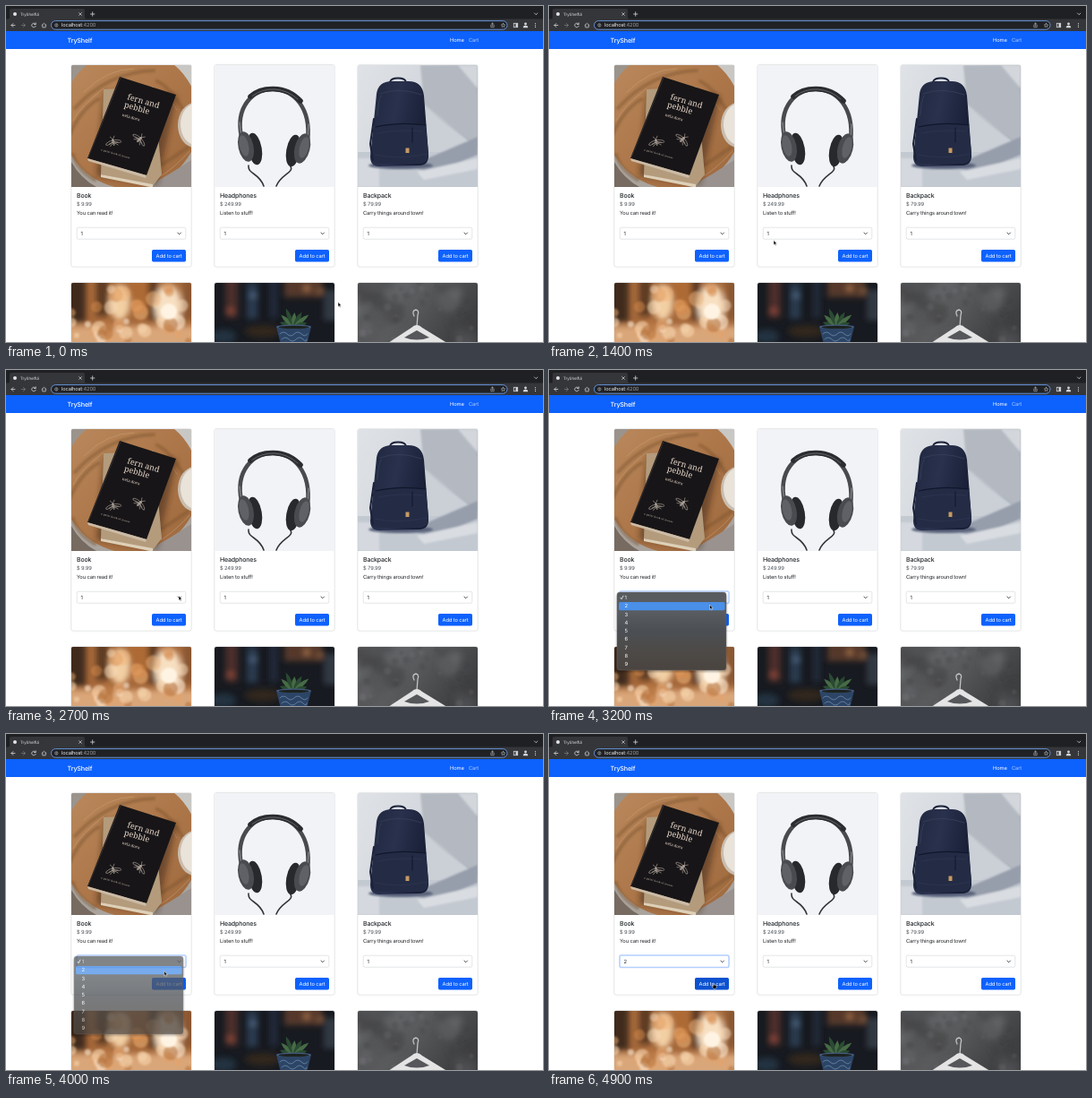
Recreate the animation shown at these times as an HTML page. Size 600 px wide and 375 px high, loop 5 s.

```html
<!DOCTYPE html>
<html lang="en">
<head>
<meta charset="utf-8">
<title>TryShelfUi</title>
<style>
html, body { margin: 0; width: 100%; height: 100%; overflow: hidden; background: #fff; }
svg { display: block; width: 100vw; height: 100vh; }
text { font-family: Inter, "Open Sans", sans-serif; font-size: 5.8px; letter-spacing: -.025em; white-space: pre; text-rendering: geometricPrecision; }
.title { font-size: 7px; font-weight: 550; }
.line { fill: none; stroke-linecap: round; stroke-linejoin: round; }
.book text { font-family: "Noto Serif", "Liberation Serif", serif; fill: #e9d9cb; letter-spacing: 0; }
</style>
</head>
<body>
<svg id="stage" viewBox="0 0 600 375" preserveAspectRatio="none"></svg>
<script>
const LOOP = 5000, STEP = 100;
const OPEN = 2800, FADE = 3800, CLOSE = 4200;
const BLUE = '#0d61fd';
const stage = document.getElementById('stage');

const rect = (x, y, w, h, fill, more = '') => `<rect x="${x}" y="${y}" width="${w}" height="${h}" fill="${fill}" ${more}/>`;
const oval = (x, y, rx, ry, fill, more = '') => `<ellipse cx="${x}" cy="${y}" rx="${rx}" ry="${ry}" fill="${fill}" ${more}/>`;
const dot = (x, y, r, fill, more) => oval(x, y, r, r, fill, more);
const shape = (d, fill, more = '') => `<path d="${d}" fill="${fill}" ${more}/>`;
const line = (d, stroke, width = 1, more = '') => `<path class="line" d="${d}" stroke="${stroke}" stroke-width="${width}" ${more}/>`;
const text = (x, y, s, fill, more = '') => `<text x="${x}" y="${y}" fill="${fill}" ${more}>${s}</text>`;
const group = (body, more = '') => `<g ${more}>${body}</g>`;
const soft = (body, n) => group(body, `filter="url(#blur${n})"`);
const gradient = (id, stops, dir = 'x2="0" y2="1"') => `<linearGradient id="${id}" ${dir}>` +
  stops.map((c, i) => `<stop offset="${i / (stops.length - 1)}" stop-color="${c}"/>`).join('') + '</linearGradient>';

function spots(seed, count, tones, top, bottom, size, opacity) {
  const random = () => (seed = seed * 16807 % 2147483647) / 2147483647;
  return Array.from({ length: count }, (_, i) =>
    dot(random() * 134, top + random() * (bottom - top), size * (.5 + random()), tones[i % tones.length], `opacity="${opacity}"`)).join('');
}

function defs() {
  const blurs = [1, 3, 7].map(n => `<filter id="blur${n}" x="-50%" y="-50%" width="200%" height="200%"><feGaussianBlur stdDeviation="${n}"/></filter>`);
  const clips = [0, 1].map(row => `<clipPath id="photo${row}"><path d="M0 ${row ? 68 : 136}V2Q0 0 2 0H132Q134 0 134 2V${row ? 68 : 136}Z"/></clipPath>`);
  return `<defs>${blurs.join('')}${clips.join('')}
    ${gradient('wood', ['#bb8c60', '#ad774a', '#9c683d'], 'x2="1" y2="1"')}
    ${gradient('wall', ['#dfe2e6', '#d5d9df', '#a9afb8'], 'x2="1" y2=".4"')}
    ${gradient('pack', ['#20273f', '#29314d', '#191f36'], 'x2="1" y2=".3"')}
    ${gradient('slate', ['#4b4c4e', '#5a5b5d', '#3f4042'], 'x2="1" y2=".4"')}
    ${gradient('menuFill', ['#585b5e', '#595d61', '#4b4f54', '#4d4a47', '#4a4440'])}
  </defs>`;
}

function browser() {
  const ink = '#d5d7da';
  return rect(0, 0, 600, 15, '#1f2023') +
    shape('M2 15Q4 15 4 13V5Q4 3 6 3H86Q88 3 88 5V13Q88 15 90 15Z', '#35363a') +
    rect(0, 14.5, 600, 13.5, '#35363a') +
    dot(10, 9, 2, '#e4e4e4') +
    text(16, 10.7, 'TryShelfUi', '#dddee0', 'style="font-size:4.5px"') +
    line('M81.6 7.6l2.8 2.8m0-2.8l-2.8 2.8', ink, .7) +
    line('M94.5 9h4.4M96.7 6.8v4.4', ink, .8) +
    line('M590.5 8l1.7 1.7 1.7-1.7', ink, .8) +
    line('M10 21.5H6m2-2l-2 2 2 2', ink, .8) +
    line('M17.5 21.5h4m-2-2l2 2-2 2', '#77797d', .8) +
    line('M33 20.2a2.3 2.3 0 1 0 .2 2.2M33.2 18.8v1.7h-1.7', ink, .8) +
    line('M40 21.5l2.5-2.2 2.5 2.2M40.8 21.2v2.7h3.4v-2.7', ink, .7) +
    rect(50.5, 16.6, 509.5, 9.6, '#202124', 'rx="4.8" stroke="#6da0ea" stroke-width=".9"') +
    dot(56.3, 21.4, 1.7, 'none', `stroke="${ink}" stroke-width=".5"`) + line('M56.3 21.3v1M56.3 20.4v.1', ink, .5) +
    text(62, 23.4, 'localhost<tspan fill="#9a9da1">:4200</tspan>', '#eceded', 'style="font-size:5.7px"') +
    line('M542.4 21h-.6v2.7h3.4v-2.7h-.6M543.5 22.3v-3.4m-1 1l1-1 1 1', ink, .5) +
    line('M555.5 19.3l.7 1.4 1.5.2-1.1 1.1.3 1.5-1.4-.7-1.4.7.3-1.5-1.1-1.1 1.5-.2Z', ink, .5) +
    rect(567.3, 19.3, 4.4, 4.4, 'none', `stroke="${ink}" stroke-width=".8"`) + rect(569.5, 19.3, 2.2, 4.4, ink) +
    dot(580.5, 20, 1.4, ink) + shape('M577.8 24.2q0-2.4 2.7-2.4t2.7 2.4Z', ink) +
    [19.6, 21.5, 23.4].map(y => dot(591.5, y, .6, ink)).join('') +
    rect(0, 28, 600, 20, BLUE) +
    text(68.6, 41, 'TryShelf', '#fff', 'style="font-size:7.2px;font-weight:550"') +
    text(496, 40.3, 'Home', '#fff') + text(517, 40.3, 'Cart', '#a9c7ff');
}

/* Photos are drawn in a 134 by 136 box. */
function bookPhoto() {
  const bee = (x, y, turn) => group(
    oval(0, 0, 1.4, 3.8, '#b9aea4') +
    [-1, 1].map(s => oval(s * 4.4, -1.5, 4.4, 1.5, 'none', `stroke="#cfc3b8" stroke-width=".5" transform="rotate(${s * 18})"`) +
      line(`M${s} 1l${s * 3.5} 3M${s * .6} -4l${s * 1.8} -2.5M${s} 0l${s * 4} 1`, '#cfc3b8', .5)).join('') +
    line('M-1.2 -1h2.4M-1.3 1h2.6M-1 2.6h2', '#1c1a1a', .5),
    `transform="translate(${x} ${y}) rotate(${turn})"`);
  return rect(0, 0, 134, 136, '#aaa49e') +
    shape('M0 0H45Q15 12 0 38Z', '#9b948d') + shape('M100 0H134V40Z', '#c9c7c4') +
    oval(66, 60, 77, 78, 'url(#wood)') +
    soft(line('M4 48Q40 8 92 6M-2 78Q10 50 30 38M96 18Q112 26 126 52M90 118Q116 102 130 92M2 100Q6 116 26 128', '#7d5330', 4, 'opacity=".45"'), 1) +
    line('M14 30Q40 4 70 4M2 62Q10 46 36 26M100 30Q110 36 118 50M100 124Q118 112 132 96', '#cda47a', .8, 'opacity=".6"') +
    shape('M84 136Q110 122 134 106V136Z', '#99928f') + shape('M0 108Q10 126 28 136H0Z', '#776b61') +
    oval(138, 67, 19, 25, '#c9bdaf') + oval(139, 66, 17, 23, '#e9e3da') +
    soft(shape('M36 30L118 34 96 134 28 124Z', '#3b2414', 'opacity=".5"'), 3) +
    shape('M36 27L92 24 101 122 91 135 33 122Z', '#b39b7c') + shape('M33 122L91 133V136H88L33 125Z', '#ded0b8') +
    shape('M54 13L117 33 84 123 18 104Z', '#171517') +
    shape('M18 104L84 123 83 126 19 107Z', '#cbbba6') + line('M55 14L19 103', '#3a3537', .8) +
    group(
      text(0, 0, 'fern and', '#e9d9cb', 'style="font-size:9px"') +
      text(-1, 9.4, 'pebble', '#e9d9cb', 'style="font-size:9px"') +
      text(0, 19.6, 'nela doru', '#e9d9cb', 'style="font-size:4.4px"') +
      text(-12, 63, 'a quiet book of leaves', '#8b827b', 'style="font-size:2.6px;letter-spacing:.12em"'),
      'class="book" transform="translate(62 38) rotate(16)"') +
    bee(47, 86, -12) + bee(76, 83, 45);
}

function headphonePhoto() {
  return rect(0, 0, 134, 136, '#f2f3f7') +
    line('M38 112C37 122 50 120 55 135', '#343538', 1.6) + line('M85 113C89 120 74 122 69 135', '#343538', 1.6) +
    line('M30 80C23 46 43 27 65 27C89 27 108 48 104 84', '#494a4e', 4.6) +
    line('M40 35Q50 26 66 26.5Q84 27 96 40', '#2b2c2f', 5.6) + line('M42 34.5Q53 26.5 67 27Q82 28 93 38', '#64656a', 1) +
    line('M28 64l2 16M105 66l-1 18', '#7c7d82', 1.5) +
    oval(45, 93.5, 7.8, 18, '#28292c', 'transform="rotate(-10 45 93.5)"') +
    oval(35, 91, 8.5, 17, '#4a4b50', 'transform="rotate(-12 35 91)"') +
    oval(33, 90, 5, 12, '#606166', 'transform="rotate(-12 33 90)"') +
    oval(88, 95.5, 7.8, 18, '#28292c', 'transform="rotate(10 88 95.5)"') +
    oval(98, 93, 8.5, 17, '#4a4b50', 'transform="rotate(14 98 93)"') +
    oval(100, 92, 5, 12, '#606166', 'transform="rotate(14 100 92)"');
}

function backpackPhoto() {
  return rect(0, 0, 134, 136, 'url(#wall)') +
    soft(shape('M70 0H118L134 34V90L74 44Z', '#b4b9c1') + shape('M112 0H134V26Z', '#d3d7dc') + shape('M70 44L134 92V106H70Z', '#cbd0d7'), 1) +
    rect(0, 97, 134, 39, '#c3c9d1') +
    soft(shape('M60 112L134 80V100L82 121Z', '#969dab') + shape('M0 104H24V136H0Z', '#d5d9df') + shape('M66 119L134 104V116L74 128Z', '#d9dde2'), 1) +
    soft(oval(48, 112, 36, 4, '#59627a'), 1) +
    line('M36 19Q37 14.5 45 14.5Q53 14.5 54 19', '#1b2238', 2) +
    shape('M21 32Q23 18 38 18H57Q72 18 74 34L79 99Q80 111 70 112L24 113Q14 113 14 102Z', 'url(#pack)') +
    shape('M20 69Q46 63 76 67L79 99Q79 109 70 110H24Q16 109 17 99Z', '#242b45') +
    line('M20 69Q46 63 76 67', '#10162a', 1.2) + line('M25 32Q46 24 71 33M22 56Q23 40 26 34', '#39415a', .8) +
    line('M23 76Q46 71 73 74M19 100Q46 106 77 99', '#333a57', .6) +
    line('M18 60L14 88 17 106', '#1c223a', 2) + line('M61 70v16', '#10162a', 1) +
    rect(53.5, 92.5, 4, 5.5, '#c59a62');
}

function bokehPhoto() {
  return rect(0, 0, 134, 68, '#a5683a') +
    soft(rect(-8, -8, 24, 52, '#3f2a1f') + rect(28, -8, 13, 45, '#5c3a24') + rect(62, -8, 24, 42, '#ad6a36') +
      rect(86, -8, 10, 50, '#5a3722') + oval(54, 22, 11, 20, '#f3cfa4') + oval(108, 26, 15, 24, '#f7dfc2') +
      rect(125, -5, 20, 46, '#8a5730') + rect(-8, 48, 150, 28, '#d9a679'), 3) +
    soft(spots(7, 14, ['#f0b57a', '#d58a4c', '#f8dcb9'], 2, 36, 6, .5) +
      spots(31, 26, ['#f6d3ab', '#e2a46c', '#fbe7d0', '#b87440'], 42, 68, 6, .6), 1) +
    soft(dot(109, 32, 9, '#fff4e3'), 1);
}

function plantPhoto() {
  const leaf = (turn, size, fill) => shape(`M0 0Q-5 ${-size / 2} 0 ${-size}Q5 ${-size / 2} 0 0Z`, fill, `transform="translate(88 49) rotate(${turn})"`);
  return rect(0, 0, 134, 68, '#171a20') +
    soft(rect(12, -5, 14, 44, '#4c2e29') + rect(36, 0, 12, 40, '#2b3b4f') + rect(78, -8, 42, 24, '#54392c') +
      rect(62, -5, 8, 44, '#232c3b') + rect(122, 8, 20, 34, '#323843') + oval(54, 54, 20, 7, '#30261f') + oval(10, 60, 14, 8, '#23303f'), 3) +
    soft(dot(103, 6, 4, '#a2704a') + dot(18, 31, 4, '#8c4637') + dot(43, 14, 4, '#4b6078') + dot(118, 9, 4, '#7d5439'), 3) +
    [-72, -46, -22, 5, 30, 52, 74].map((a, i) => leaf(a, 16 + i % 3 * 3, i % 2 ? '#466b45' : '#2a4a32')).join('') +
    shape('M69 49H108L103 69H74Z', '#2c4566') + oval(88.5, 49, 19.5, 2.6, '#425c80') + oval(88.5, 49.5, 17, 1.8, '#1e221f') +
    line('M73 57q4 -4 8 0t8 0 8 0 7 0M75 63q4 -4 8 0t8 0 8 0 4 0', '#6d89aa', .8);
}

function shirtPhoto() {
  return rect(0, 0, 134, 68, 'url(#slate)') +
    soft(spots(19, 22, ['#6a6b6d', '#3b3c3e', '#545557'], 0, 68, 9, .5), 3) +
    soft(spots(53, 26, ['#77787a', '#37383a'], 0, 68, 3, .25), 1) +
    line('M63 37Q60 31 65 30Q69 31 67 36L66 49', '#c4c4c5', 1.3) +
    shape('M66 47Q69 47 72 50L103 69H31L60 50Q63 47 66 47Z', '#e4e4e5') +
    shape('M66 53L80 61Q66 66 52 61Z', '#56575a');
}

const photos = [bookPhoto, headphonePhoto, backpackPhoto, bokehPhoto, plantPhoto, shirtPhoto];
const goods = [
  ['Book', '9.99', 'You can read it!'],
  ['Headphones', '249.99', 'Listen to stuff!'],
  ['Backpack', '79.99', 'Carry things around town!']
];

function card(i) {
  const row = Math.floor(i / 3), x = 73 + i % 3 * 160, y = row ? 309 : 66;
  const photo = group(photos[i](), `transform="translate(${x} ${y})" clip-path="url(#photo${row})"`);
  const frame = rect(x - .2, y - .4, 134.4, 225.6, '#fff', 'rx="2.2" stroke="#d9dadb" stroke-width=".7"');
  if (row) return frame + photo;
  const [name, price, note] = goods[i], first = i === 0;
  return frame + photo +
    text(x + 6, 214, name, '#212529', 'class="title"') +
    text(x + 6, 222.6, '$ ' + price, '#4c5157') +
    text(x + 6, 233.2, note, '#212529') +
    (first ? rect(78.2, 246.2, 123.6, 15, '#c2d7ff', 'id="ring" rx="2.3"') : '') +
    rect(x + 6.2, 247.2, 121.6, 13, '#fff', `rx="1.6" stroke="#ced4da" stroke-width=".6" ${first ? 'id="select"' : ''}`) +
    text(x + 10.6, 255.8, '1', '#212529', first ? 'id="amount"' : '') +
    line(`M${x + 118.9} 253l1.8 1.8 1.8 -1.8`, '#343a40', .9) +
    rect(x + 90, 272, 38, 13.4, BLUE, `rx="1.7" ${first ? 'id="button"' : ''}`) +
    text(x + 109, 280.8, 'Add to cart', '#fff', 'text-anchor="middle"');
}

function menu() {
  let items = '';
  for (let n = 1; n <= 9; n++) items += text(84.5, 246.6 + n * 9.3, n, '#fff');
  return group(
    soft(rect(75.5, 250, 123, 87, '#000', 'rx="3" opacity=".3"'), 1) +
    rect(76, 248, 122, 87, 'url(#menuFill)', 'rx="3" stroke="#6f7274" stroke-width=".4"') +
    rect(78, 259, 118.5, 9.2, '#4a8fe8', 'rx="1.6"') +
    line('M79.8 254.2l1.2 1.5 2 -3.6', '#fff', .8) + items, 'id="menu"');
}

function cursors() {
  const edge = 'stroke="#fff" stroke-width=".5" stroke-linejoin="round"';
  return shape('M0 0V5.2L1.2 4.1 2 6 2.9 5.6 2.1 3.8H3.7Z', '#000', `id="arrow" ${edge}`) +
    shape('M-.6 .3Q0 -.4 .5 .3V2.2Q1.2 1.7 1.5 2.3 2.2 1.9 2.4 2.6 3.2 2.3 3.2 3.2V4.4Q3 6 2 6.4H0Q-1.4 5 -2 3.6-1.5 3-.6 3.8Z', '#000', `id="hand" ${edge}`);
}

stage.innerHTML = defs() + rect(0, 0, 600, 375, '#fff') + browser() +
  photos.map((_, i) => card(i)).join('') + menu() + cursors();

const [ring, select, amount, button, list, arrow, hand] =
  ['ring', 'select', 'amount', 'button', 'menu', 'arrow', 'hand'].map(id => document.getElementById(id));
const show = (node, on) => node.setAttribute('visibility', on ? 'visible' : 'hidden');

const path = [[0, 371, 330.5], [500, 371, 330.5], [1400, 251, 261.5], [2300, 193, 252],
  [2800, 193, 252], [3200, 179.5, 262], [4000, 176.7, 264.6], [4300, 176.7, 264.6], [4800, 184, 278], [LOOP, 184, 278]];

function cursorAt(t) {
  const i = path.findIndex(p => p[0] > t), a = path[i - 1], b = path[i];
  const u = (t - a[0]) / (b[0] - a[0]), k = u * u * (3 - 2 * u);
  return [a[1] + (b[1] - a[1]) * k, a[2] + (b[2] - a[2]) * k];
}

function draw(t) {
  const [x, y] = cursorAt(t);
  const focused = t >= OPEN, hover = y > 272 && x > 163 && x < 201;
  const fade = t <= FADE ? 1 : Math.max(0, 1 - ((t - FADE) / (CLOSE - FADE)) ** 2);
  show(ring, focused);
  select.setAttribute('stroke', focused ? '#86b7fe' : '#ced4da');
  amount.textContent = t >= CLOSE ? '2' : '1';
  show(list, t >= OPEN && t < CLOSE);
  list.setAttribute('opacity', fade);
  button.setAttribute('fill', hover ? '#0b51d0' : BLUE);
  show(arrow, !hover);
  show(hand, hover);
  for (const node of [arrow, hand]) node.setAttribute('transform', `translate(${x} ${y})`);
}

const start = performance.now();
function tick() {
  const t = (performance.now() - start) % LOOP;
  draw(Math.floor(t / STEP) * STEP);
  requestAnimationFrame(tick);
}
tick();
</script>
</body>
</html>
```
